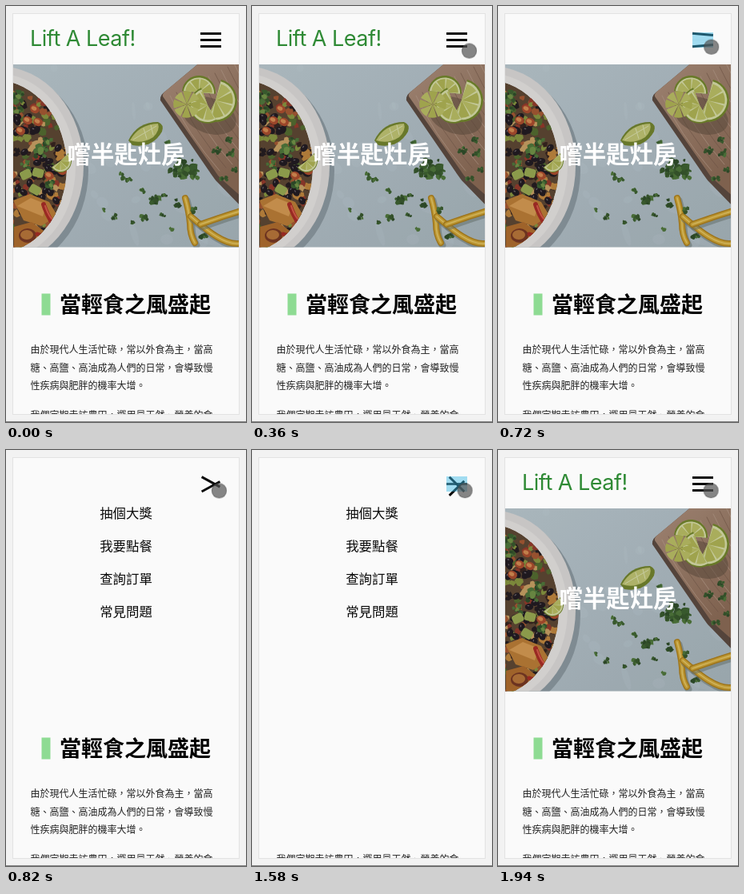
These frames come from a looping animation (300x520 px, 1960 ms). An HTML page:

```html
<!DOCTYPE html>
<html lang="zh-Hant">
<head>
<meta charset="utf-8">
<style>
  html, body { margin: 0; width: 100%; height: 100%; overflow: hidden; background: #f2f2f2; }
  body { position: relative; font-family: "Noto Sans CJK TC", "Noto Sans CJK", sans-serif; color: #0b0b0b; }
  svg, .abs { position: absolute; left: 0; top: 0; }
  #menu { left: 9px; top: 10px; width: 282px; height: 0; overflow: hidden; background: #fafafa; }
  #menu p { position: absolute; left: 0; width: 282px; margin: 0; text-align: center;
    font-size: 16.4px; line-height: 24px; }
  .bar { left: 243px; width: 26px; height: 3px; background: #0b0b0b; }
  #tap { left: 243px; top: 33px; width: 26px; height: 19px; background: rgba(51, 181, 229, .45); opacity: 0; }
  #frame { left: 8px; top: 9px; width: 282px; height: 500px; border: 1px solid #e2e2e2; }
  #base { top: 518.5px; width: 300px; height: 1.5px; background: #858585; }
  #dot { left: -9.5px; top: -9.5px; width: 19px; height: 19px; border-radius: 50%;
    background: rgba(82, 82, 82, .7); box-shadow: inset 0 0 0 1px rgba(70, 70, 70, .35); }
</style>
</head>
<body>
<svg id="page" width="300" height="520">
  <defs>
    <clipPath id="panel"><rect x="9" y="10" width="282" height="500"/></clipPath>
    <clipPath id="hero"><rect x="9" y="73" width="282" height="228.5"/></clipPath>
    <clipPath id="bowl"><ellipse cx="-12" cy="201" rx="88" ry="108"/></clipPath>
    <linearGradient id="table" x2="1" y2="1">
      <stop offset="0" stop-color="#b3c1c8"/><stop offset="1" stop-color="#a2afb6"/>
    </linearGradient>
    <linearGradient id="wood" x2=".6" y2="1">
      <stop offset="0" stop-color="#a68a78"/><stop offset="1" stop-color="#866753"/>
    </linearGradient>
  </defs>
  <g clip-path="url(#panel)">
    <rect x="9" y="10" width="282" height="500" fill="#fafafa"/>
    <text x="30" y="50" font-family="Inter, sans-serif" font-size="27" letter-spacing="-.5" fill="#2f8a35">Lift A Leaf!</text>
    <g id="photo" clip-path="url(#hero)"></g>
    <text x="150" y="196" text-anchor="middle" font-size="29.4" font-weight="700" fill="#fff">嚐半匙灶房</text>
    <rect x="44.5" y="359.5" width="11" height="27" fill="#8edb93"/>
    <text x="67" y="383" font-size="27" font-weight="700">當輕食之風盛起</text>
    <g id="copy" font-size="12" fill="#222"></g>
  </g>
</svg>
<div id="menu" class="abs"></div>
<div class="abs bar" style="top:33px"></div>
<div class="abs bar" style="top:41px"></div>
<div class="abs bar" style="top:49px"></div>
<div id="tap" class="abs"></div>
<div id="frame" class="abs"></div>
<div id="base" class="abs"></div>
<div id="dot" class="abs"></div>
<script>
const LOOP = 1960;
const $ = s => document.querySelector(s);
const photo = $('#photo');

function add(tag, attrs, parent = photo) {
  const el = document.createElementNS('http://www.w3.org/2000/svg', tag);
  for (const k in attrs) el.setAttribute(k, attrs[k]);
  parent.append(el);
  return el;
}

let seed = 11;
const rnd = (a = 0, b = 1) => {
  seed = (seed * 16807) % 2147483647;
  return a + (b - a) * seed / 2147483647;
};
const pick = list => list[Math.floor(rnd(0, list.length))];
const path = (d, fill, parent, extra) => add('path', { d, fill, ...extra }, parent);
const stroke = (d, color, width, parent) =>
  path(d, 'none', parent, { stroke: color, 'stroke-width': width, 'stroke-linecap': 'round', 'stroke-linejoin': 'round' });
const oval = (cx, cy, rx, ry, fill, parent, turn = 0) =>
  add('ellipse', { cx, cy, rx, ry, fill, transform: `rotate(${turn} ${cx} ${cy})` }, parent);

function blob(x, y, r, fill, parent, n = 9) {
  const pts = [];
  for (let i = 0; i < n; i++) {
    const a = i / n * Math.PI * 2, q = r * rnd(.55, 1.1);
    pts.push((x + q * Math.cos(a)).toFixed(1) + ',' + (y + q * Math.sin(a)).toFixed(1));
  }
  add('polygon', { points: pts.join(' '), fill }, parent);
}

function herb(x, y, r, parent) {
  const n = Math.ceil(r * 1.1);
  for (let i = 0; i < n; i++)
    blob(x + rnd(-r, r) * .75, y + rnd(-r, r) * .65, rnd(1.5, 2 + r * .3),
      pick(['#2e4a28', '#3c5f30', '#4d7339', '#36552c']), parent);
}

// Citrus slice; sweep is the part of the circle that is shown
function lime(x, y, r, turn, sweep = 360) {
  const g = add('g', { transform: `translate(${x} ${y}) rotate(${turn})` });
  const at = (q, deg) => {
    const a = deg * Math.PI / 180;
    return (q * Math.cos(a)).toFixed(1) + ' ' + (q * Math.sin(a)).toFixed(1);
  };
  const sector = (q, a, b) => `M0 0L${at(q, a)}A${q} ${q} 0 ${b - a > 180 ? 1 : 0} 1 ${at(q, b)}Z`;
  const end = Math.min(sweep, 359.9);
  path(sector(r, 0, end), '#6f822a', g);
  path(sector(r * .91, 0, end), '#ced3a0', g);
  for (let a = 0; a < sweep - 5; a += 45)
    path(sector(r * .8, a + 3, Math.min(a + 42, sweep)), a % 90 ? '#a9ad52' : '#b4b862', g);
}

function drawTable() {
  add('rect', { x: 9, y: 73, width: 282, height: 229, fill: 'url(#table)' });
  for (let i = 0; i < 40; i++)
    oval(rnd(60, 291), rnd(73, 301), rnd(4, 16), rnd(2, 7), '#c3cfd4', photo, rnd(0, 90)).setAttribute('opacity', .13);
}

function drawBoard() {
  path('M193 118Q192 111 200 106L243 70H295V252L268 224Q262 219 257 211Z', '#59483f');
  path('M196 113Q195 109 201 105L243 70H295V239L270 217Q265 213 261 206Z', 'url(#wood)');
  for (let i = 0; i < 12; i++) {
    const x = 205 + i * 8, y = 112 - i * 4;
    stroke(`M${x} ${y}Q${x + 22} ${y + 48} ${x + 62} ${y + 94}`, i % 2 ? '#75594a' : '#b39a89', .7);
  }
  oval(254, 137, 35, 22, '#5b483b', photo, 20).setAttribute('opacity', .5);
  lime(262, 118, 27, -75, 190);
  lime(241, 108, 21, 185, 180);
  lime(252, 124, 23, 60, 190);
  lime(226, 123, 21, 25);
  for (const [x, y, r] of [[264, 181, 6], [281, 183, 6], [279, 168, 4], [272, 214, 5], [286, 205, 4]]) herb(x, y, r);
}

function drawBowl() {
  oval(-7, 206, 110, 126, '#87949b');
  oval(-10, 200, 107, 125, '#d3d1d0');
  oval(-12, 201, 99, 117, '#dedcda');
  const g = add('g', { 'clip-path': 'url(#bowl)' });
  oval(-12, 201, 88, 108, '#5a4532', g);
  const tones = ['#35231f', '#241d20', '#9f5632', '#b9823d', '#51682f', '#83903f', '#8e382a', '#c19b61'];
  for (let i = 0; i < 170; i++) blob(rnd(6, 76), rnd(92, 304), rnd(3, 7), pick(tones), g);
  for (let i = 0; i < 34; i++) {
    const x = rnd(10, 70), y = rnd(130, 265), a = rnd(0, 180);
    oval(x, y, 5.2, 4, '#211b21', g, a);
    oval(x - 1.2, y - 1.4, 1.5, .7, '#696168', g, a);
  }
  for (const [x, y] of [[36, 129], [27, 143], [40, 145], [18, 156], [54, 212], [70, 206]]) {
    oval(x, y, 6, 5, '#a54a2d', g, 25);
    oval(x - 1, y - 1, 3.4, 2.4, '#ce8750', g, 25);
  }
  for (const [x, y, r] of [[15, 113, 10], [13, 132, 8], [43, 181, 11], [52, 170, 7], [24, 199, 7], [56, 224, 7], [18, 248, 6]]) {
    herb(x, y, r, g);
    blob(x, y, r * .45, '#6d8d45', g);
  }
  for (const [x, y, a] of [[40, 209, 15], [25, 211, -25], [36, 230, 30]])
    add('rect', { x: x - 7, y: y - 6, width: 14, height: 11, rx: 3, fill: '#94a450', transform: `rotate(${a} ${x} ${y})` }, g);
  path('M9 243L30 235L54 245L64 262L44 275L22 268Z', '#b57935', g);
  path('M14 250L31 240L51 248L46 263Z', '#ce9550', g);
  path('M10 276L32 270L50 283L39 301H10Z', '#a9692d', g);
  oval(27, 287, 11, 9, '#733622', g);
  oval(26, 286, 8, 6, '#b17238', g);
  stroke('M47 248Q51 260 56 268Q63 272 68 265', '#a32c25', 6, g);
  stroke('M49 250Q53 262 58 267', '#cf5947', 2, g);
  stroke('M39 285Q49 290 55 278', '#9f2c24', 5, g);
  lime(68, 194, 14, -45, 190);
}

function drawLoose() {
  path('M153 168Q164 145 190 145Q198 148 195 157Q183 178 158 174Z', '#6e7f2d');
  path('M155 168Q166 148 190 147Q193 155 184 164Q170 173 155 168Z', '#b9bd70');
  stroke('M159 167L188 150M172 153L176 166M181 149L184 161', '#d3d8a8', 1);
  for (const [x, y, r] of [[225, 203, 15], [211, 209, 9], [237, 211, 8], [147, 213, 6], [154, 217, 4], [186, 242, 9],
    [170, 230, 4], [198, 236, 4], [173, 267, 6], [136, 263, 4], [158, 270, 3], [213, 246, 6], [121, 255, 3],
    [196, 262, 4], [203, 171, 4], [207, 280, 3], [247, 287, 5]]) herb(x, y, r);
  const peppers = ['M224 240Q229 258 230 272Q230 286 236 296', 'M231 263Q253 282 263 288Q279 298 291 297',
    'M243 273Q263 266 275 262L294 256'];
  for (const d of peppers) {
    const shade = stroke(d, '#66736f', 9);
    shade.setAttribute('transform', 'translate(2 3)');
    shade.setAttribute('opacity', .5);
    stroke(d, '#a87c1d', 8);
    stroke(d, '#c9a136', 5);
    stroke(d, '#dfc268', 1.3);
  }
  herb(236, 256, 5);
}

drawTable();
drawBoard();
drawBowl();
drawLoose();
add('rect', { x: 9, y: 73, width: 282, height: 229, fill: '#000', opacity: .06 });

[['由於現代人生活忙碌，常以外食為主，當高', 434], ['糖、高鹽、高油成為人們的日常，會導致慢', 456.5],
 ['性疾病與肥胖的機率大增。', 479], ['我們定期走訪農田，選用最天然、營養的食', 515.5]]
  .forEach(([line, y]) => { add('text', { x: 30.5, y }, $('#copy')).textContent = line; });

['抽個大獎', '我要點餐', '查詢訂單', '常見問題'].forEach((label, i) => {
  const p = document.createElement('p');
  p.textContent = label;
  p.style.top = 56 + i * 41.1 + 'px';
  $('#menu').append(p);
});

// Steps are [time, value, easing towards the next step]
function play(el, prop, steps) {
  const all = [[0, steps[0][1]], ...steps, [LOOP, steps[steps.length - 1][1]]];
  const frames = all.map(([t, value, easing = 'linear']) => ({ offset: t / LOOP, [prop]: value, easing }));
  const run = el.animate(frames, { duration: LOOP, iterations: Infinity });
  run.startTime = 0;
  run.startTime = document.timeline.currentTime;
}

const OPEN = 680, OPENED = 1060, CLOSE = 1572, CLOSED = 1937;
const toggle = (el, prop, off, on, opened = OPENED, closed = CLOSED) =>
  play(el, prop, [[OPEN, off, 'ease'], [opened, on], [CLOSE, on, 'ease'], [closed, off]]);

const [top1, mid, low] = document.querySelectorAll('.bar');
toggle($('#menu'), 'height', '0px', '500px');
toggle(top1, 'translate', '0 0', '0 8.5px');
toggle(top1, 'rotate', '0deg', '45deg');
toggle(mid, 'opacity', 1, 0, OPEN + 50, CLOSE + 16);
toggle(low, 'translate', '0 0', '0 -7.5px', OPENED, CLOSE + 24);
toggle(low, 'rotate', '0deg', '-45deg');
play($('#tap'), 'opacity', [[OPEN, 0, 'step-end'], [OPEN + 1, 1, 'step-end'], [OPEN + 120, 0, 'step-end'],
  [CLOSE, 1, 'step-end'], [CLOSE + 120, 0]]);

// The pointer glides in diagonally and slows down exponentially
const glide = [];
for (let t = 0; t <= 1000; t += 40) {
  const d = 44 * Math.exp(-t / 174);
  glide.push([t, `${265.5 + d}px ${50 + d}px`]);
}
play($('#dot'), 'translate', glide);
</script>
</body>
</html>
```
